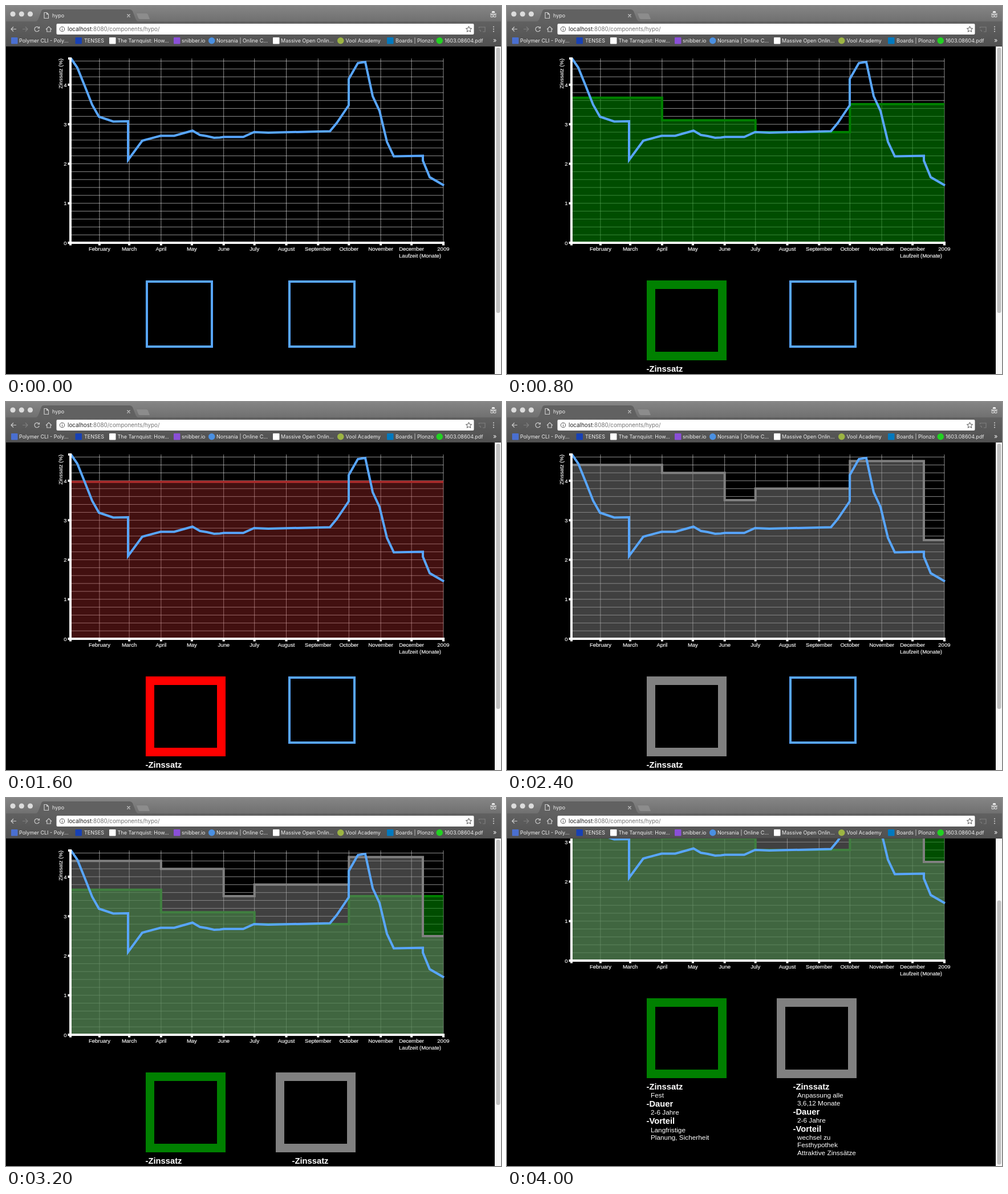
Write an HTML page that moves like this. It is 868x645 px and loops after 4.8 s.

```html
<!DOCTYPE html>
<html lang="de">
<head>
<meta charset="utf-8">
<title>hypo</title>
<style>
html, body { margin: 0; width: 100%; height: 100%; overflow: hidden; background: #000; }
svg { display: block; }
.ui { font: 9px Inter, Roboto, sans-serif; fill: #eee; }
.url { font-size: 9.9px; fill: #222; }
.url tspan { fill: #757575; }
.icon { fill: none; stroke: #ccc; stroke-width: 1.2; }
.chart { font: 9.5px "Liberation Sans", Arial, sans-serif; fill: #fff; stroke: #fff; stroke-width: .15; }
.info { font: 11.8px "Liberation Sans", Arial, sans-serif; fill: #fff; }
.info .head { font-weight: bold; font-size: 14.75px; }
.grid { stroke: #fff; stroke-opacity: .7; stroke-width: .8; fill: none; }
.axis { stroke: #fff; stroke-width: 4; fill: none; }
.curve { stroke: #58a6ff; stroke-width: 4; fill: none; }
.end { text-anchor: end; }
.mid { text-anchor: middle; }
</style>
</head>
<body>
<svg width="868" height="645" viewBox="0 0 868 645">
  <defs>
    <linearGradient id="strip" x2="0" y2="1"><stop stop-color="#858585"/><stop offset="1" stop-color="#707070"/></linearGradient>
    <linearGradient id="bar" x2="0" y2="1"><stop stop-color="#616161"/><stop offset="1" stop-color="#505050"/></linearGradient>
  </defs>

  <svg id="page" y="71" width="857" height="574">
    <path id="grid" class="grid"/>
    <g id="areas"></g>
    <path class="curve" d="M114 92L125 108 138 140 151 173 163 194 188 202.5 214 202V270L239 236 271 227.5H295L327 218.5 340 226 352 228 365 231 375 230.5 382 229.5H416L435 221 460 222 568 219.5 580 205 601 174V128L617 100 630 98 643 158 655 184 668 238 680 263.5 731 262.5V271L743 300 768 314.5"/>
    <path id="axis" class="axis"/>
    <g id="labels" class="chart">
      <text class="end" x="763" y="440.5">Laufzeit (Monate)</text>
      <text class="end" transform="translate(99 92) rotate(-90)">Zinssatz (%)</text>
    </g>
    <g id="cards" class="info"></g>
  </svg>

  <rect x="857" y="71" width="11" height="574" fill="#f7f7f7"/>
  <rect id="thumb" x="859.5" width="7" rx="3.5" fill="#c1c1c1"/>

  <g id="browser" class="ui">
    <rect width="868" height="27" fill="url(#strip)"/>
    <rect y="27" width="868" height="44" fill="url(#bar)"/>
    <path d="M0 70.5H868" stroke="#444"/>
    <path d="M51 27.5Q55 27 57 22L62 9Q63 6 66 6H217Q220 6 222 9L227 22Q229 27 233 27.5Z" fill="#616161"/>
    <path d="M229 13H246Q248 13 249 15L252 23H235Q233 23 232 21Z" fill="#8c8c8c"/>
    <g fill="#dcdcdc"><circle cx="12" cy="14" r="4.6"/><circle cx="27.3" cy="14" r="4.6"/><circle cx="42.5" cy="14" r="4.6"/></g>
    <path class="icon" d="M67 11.5H71.5L74.5 14.5V21.5H67ZM71.5 11.5V14.5H74.5M212.5 14.5L217.5 19.5M217.5 14.5L212.5 19.5"/>
    <text x="81" y="20">hypo</text>
    <path d="M849 13.5H860V14.7H849ZM851.5 12L852.5 9H856.5L857.5 12Z" fill="#eee"/>
    <path class="icon" stroke-width="1" d="M850 17.5a2 2 0 1 0 4 0a2 2 0 1 0-4 0M855 17.5a2 2 0 1 0 4 0a2 2 0 1 0-4 0"/>
    <path class="icon" d="M18 40.5H9M13 36.5L9 40.5 13 44.5M57.6 38A4.2 4.2 0 1 0 58.2 42M58.5 36V39H55.3M70 41L75 36 80 41M71.8 40V45H78.2V40"/>
    <path class="icon" opacity=".3" d="M29 40.5H38M34 36.5L38 40.5 34 44.5M829.5 39V37H840V45H836M829.5 42A3 3 0 0 1 832.5 45"/>
    <g fill="#ccc"><circle cx="855" cy="36.5" r="1.1"/><circle cx="855" cy="40.5" r="1.1"/><circle cx="855" cy="44.5" r="1.1"/></g>
    <rect x="88.5" y="31" width="732" height="19" rx="2" fill="#fff"/>
    <path class="icon" style="stroke:#555;stroke-width:1" d="M94.3 40.5a4.2 4.2 0 1 0 8.4 0a4.2 4.2 0 1 0-8.4 0M98.5 40V43M98.5 38V39"/>
    <path class="icon" style="stroke:#555;stroke-width:1" d="M811.5 35.5L813 39 816.6 39.3 813.9 41.7 814.7 45.3 811.5 43.4 808.3 45.3 809.1 41.7 806.4 39.3 810 39Z"/>
    <text class="url" x="108" y="44">localhost<tspan>:8080/components/hypo/</tspan></text>
    <text x="854" y="63.5" font-size="11">»</text>
  </g>
</svg>
<script>
const $ = id => document.getElementById(id);
const add = (id, markup) => $(id).insertAdjacentHTML('beforeend', markup);
const y = rate => 415 - 69.25 * rate;
const LEFT = 113, RIGHT = 767, TOP = 92;

// Axes and grid: 1.8 px per day, counted from 1 February
const dayX = days => 163.9 + 1.8 * days;
const months = ['February', 'March', 'April', 'May', 'June', 'July', 'August',
  'September', 'October', 'November', 'December', '2009'];
const monthX = months.map((_, i) => dayX((Date.UTC(2008, i + 1) - Date.UTC(2008, 1)) / 864e5));
const [, , APR, , JUN, JUL, , , OCT] = monthX;

let grid = '', axis = `M109 ${TOP}H${LEFT}V415H109M${LEFT} 419.5V415H${RIGHT}V419.5`;
months.forEach((name, i) => {
  grid += `M${monthX[i]} ${TOP}V415`;
  axis += `M${monthX[i]} 415V419.5`;
  add('labels', `<text class="mid" x="${monthX[i]}" y="428.5">${name}</text>`);
});
for (let i = 1; i <= 23; i++) grid += `M${LEFT} ${y(i / 5)}H${RIGHT}`;
for (let rate = 0; rate < 5; rate++) {
  if (rate < 4.6) axis += `M108.5 ${y(rate)}H${LEFT}`;
  add('labels', `<text class="end" x="106.5" y="${y(rate) + 3.5}">${rate}</text>`);
}
$('grid').setAttribute('d', grid);
$('axis').setAttribute('d', axis);

// Mortgage models: each step is [rate, end x]
const models = {
  green: { color: '#008000', opacity: .6, steps: [[3.67, APR], [3.1, JUL], [2.8, OCT], [3.51, RIGHT]] },
  red: { color: '#a52a2a', opacity: .4, steps: [[3.97, RIGHT]] },
  gray: { color: '#808080', opacity: .5, steps: [[4.4, APR], [4.2, JUN], [3.51, JUL], [3.8, OCT], [4.5, 731], [2.5, RIGHT]] },
};
for (const [id, { color, opacity, steps }] of Object.entries(models)) {
  const line = `M${LEFT} ${y(steps[0][0])}` + steps.map(([rate, x]) => `V${y(rate)}H${x}`).join('');
  add('areas', `<g id="${id}"><path d="${line}V415H${LEFT}Z" fill="${color}" fill-opacity="${opacity}"/>
    <path d="${line}" fill="none" stroke="${color}" stroke-width="4"/></g>`);
}

// Cards; headings start with a dash
function addCard(side, x, lines) {
  let base = 641;
  const text = lines.map((line, i) => {
    const head = line[0] === '-';
    if (i) base += head ? 16 : lines[i - 1][0] === '-' ? 14.2 : 13.3;
    return `<text x="${head ? x : x + 7.5}" y="${base}"${head ? ' class="head"' : ''}>${line}</text>`;
  });
  add('cards', `<rect id="${side}Box" fill="none"/><g id="${side}Info">${text.join('')}</g>`);
}
addCard('left', 244.5, ['-Zinssatz', 'Fest', '-Dauer', '2-6 Jahre', '-Vorteil',
  'Langfristige', 'Planung, Sicherheit']);
addCard('right', 501.5, ['-Zinssatz', 'Anpassung alle', '3,6,12 Monate', '-Dauer', '2-6 Jahre',
  '-Vorteil', 'wechsel zu', 'Festhypothek', 'Attraktive Zinssätze']);

// Bookmarks: [icon x, text x, colour, label, round icon]
[
  [9, 23, '#4a6fd0', 'Polymer CLI - Poly...'],
  [121.5, 137, '#1741b5', 'TENSES'],
  [181, 195.5, '#fff', 'The Tarnquist: How...'],
  [294, 308, '#8a4fd8', 'snibber.io'],
  [355, 369, '#4a90e2', 'Norsania | Online C...', 1],
  [468, 482, '#fff', 'Massive Open Onlin...'],
  [581, 595.5, '#9cb443', 'Vool Academy', 1],
  [668, 683, '#0079bf', 'Boards | Plonzo'],
  [754.5, 769, '#22d122', '1603.08604.pdf', 1],
].forEach(([iconX, textX, color, label, round]) => add('browser',
  `<rect x="${iconX}" y="55" width="11.5" height="11.5" rx="${round ? 5.75 : 1}" fill="${color}"/>
   <text x="${textX}" y="64">${label}</text>`));

const scenes = [
  { areas: [] },
  { areas: ['green'], left: '#008000' },
  { areas: ['red'], left: '#ff0000' },
  { areas: ['gray'], left: '#808080' },
  { areas: ['green', 'gray'], left: '#008000', right: '#808080' },
  { areas: ['green', 'gray'], left: '#008000', right: '#808080', scroll: 130 },
];
const SCENE_MS = 800;

const set = (id, attrs) => Object.entries(attrs).forEach(([key, value]) => $(id).setAttribute(key, value));
const show = (id, on) => set(id, { display: on ? 'inline' : 'none' });

function setCard(side, color) {
  const border = color ? 15 : 4, size = 110 + border;
  const x = side === 'left' ? 245 + border / 2 : 613 - border / 2 - size;
  set(side + 'Box', { x, y: 481 + border / 2, width: size, height: size,
    stroke: color || '#58a6ff', 'stroke-width': border });
  show(side + 'Info', color);
}

function render({ areas, left, right, scroll = 0 }) {
  Object.keys(models).forEach(id => show(id, areas.includes(id)));
  setCard('left', left);
  setCard('right', right);
  set('page', { viewBox: `0 ${71 + scroll} 857 574` });
  set('thumb', scroll ? { y: 179.5, height: 463 } : { y: 73, height: 465 });
}

let current;
function tick() {
  const scene = scenes[Math.floor(performance.now() / SCENE_MS) % scenes.length];
  if (scene !== current) render(current = scene);
  requestAnimationFrame(tick);
}
tick();
</script>
</body>
</html>
```
